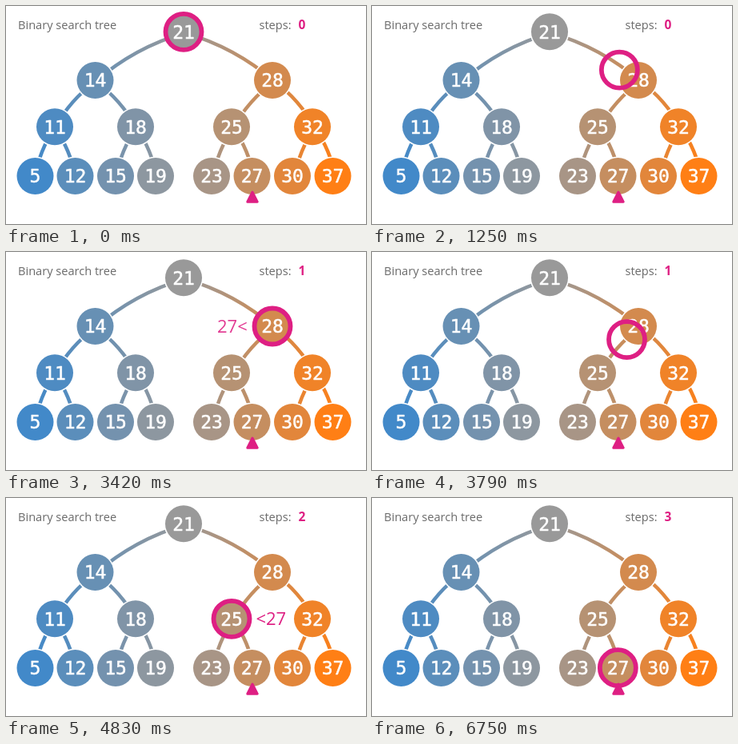
An HTML page with a canvas that plays this animation: 450 px wide and 273 px high, repeating every 8 s.

```html
<!DOCTYPE html>
<html lang="en">
<head>
<meta charset="utf-8">
<title>Binary search tree</title>
<style>
  html, body { margin: 0; width: 100%; height: 100%; overflow: hidden; background: #fff; }
  canvas { display: block; }
</style>
</head>
<body>
<canvas id="stage" width="450" height="273"></canvas>
<script>
const ctx = document.getElementById('stage').getContext('2d');
const LOOP = 8000, FRAME = 1000 / 24;
const PINK = '#de1f83', RADIUS = 23;
const BLUE = [66, 137, 201], GRAY = [153, 153, 153], ORANGE = [255, 127, 21];
const SANS = '"Open Sans", sans-serif';

// In-order list; the height follows from each index
const values = [5, 11, 12, 14, 15, 18, 19, 21, 23, 25, 27, 28, 30, 32, 37];
const xs = [36.5, 61, 86.5, 111.5, 137, 162, 187, 222, 257, 282, 307.5, 333, 358, 383, 408.5];
const rowY = [213, 151.3, 93, 32.3];

const nodes = values.map((value, i) => {
  const height = Math.log2((i + 1) & -(i + 1));
  const end = i < 7 ? BLUE : ORANGE;
  const mix = Math.abs(i - 7) / 7;
  const rgb = GRAY.map((c, j) => Math.round(c + (end[j] - c) * mix));
  return { value, height, x: xs[i], y: rowY[height], color: `rgb(${rgb})` };
});
const [root, right, inner, goal] = [7, 11, 9, 10].map(i => nodes[i]);

const moves = [
  { start: 1000, from: root, to: right },
  { start: 3750, from: right, to: inner },
  { start: 6290, from: inner, to: goal }
];

// Share of a stepped transition completed at time t
function progress(t, start, frames) {
  if (t < start) return 0;
  return Math.min(1, (Math.floor((t - start + 10) / FRAME) + 1) / frames);
}

function disc(x, y, r, color) {
  ctx.fillStyle = color;
  ctx.beginPath();
  ctx.arc(x, y, r, 0, 2 * Math.PI);
  ctx.fill();
}

function label(text, x, y, font, color, align = 'left', outline = 0) {
  ctx.font = font;
  ctx.fillStyle = ctx.strokeStyle = color;
  ctx.textAlign = align;
  ctx.fillText(text, x, y);
  if (outline) {
    ctx.lineWidth = outline;
    ctx.strokeText(text, x, y);
  }
}

function edge(a, b) {
  const side = Math.sign(b.x - a.x);
  const dx = b.x - a.x, dy = b.y - a.y;
  const shade = ctx.createLinearGradient(a.x, a.y, b.x, b.y);
  shade.addColorStop(0, a.color);
  shade.addColorStop(1, b.color);
  ctx.strokeStyle = shade;
  ctx.lineWidth = 4.5;
  ctx.beginPath();
  ctx.moveTo(a.x, a.y);
  ctx.quadraticCurveTo((a.x + b.x) / 2 + side * dy * 0.11,
    (a.y + b.y) / 2 - side * dx * 0.11, b.x, b.y);
  ctx.stroke();
}

function drawTree() {
  // The edge layer is slightly wider and lower than the nodes
  ctx.save();
  ctx.transform(1.009, 0, 0, 1, -0.5, 1.3);
  nodes.forEach((node, i) => {
    if (!node.height) return;
    const reach = 2 ** (node.height - 1);
    edge(node, nodes[i - reach]);
    edge(node, nodes[i + reach]);
  });
  ctx.restore();
  for (const { x, y, color, value } of nodes) {
    disc(x, y, RADIUS + 1.5, '#fff');
    disc(x, y, RADIUS, color);
    label(value, x, y + 8.4, '23px "DejaVu Sans Mono", monospace', '#fff', 'center', 0.5);
  }
}

function drawMarker() {
  ctx.fillStyle = ctx.strokeStyle = PINK;
  ctx.lineWidth = 3;
  ctx.lineJoin = 'round';
  ctx.beginPath();
  ctx.moveTo(308, 233);
  ctx.lineTo(314.2, 245.2);
  ctx.lineTo(301.8, 245.2);
  ctx.closePath();
  ctx.fill();
  ctx.stroke();
}

function drawHint(t, text, x, y, shown, hidden, frames) {
  ctx.globalAlpha = progress(t, shown, frames) - progress(t, hidden, frames);
  label(text, x, y, `22px ${SANS}`, PINK);
  ctx.globalAlpha = 1;
}

function drawRing(t) {
  const { start, from, to } = moves.findLast(m => t >= m.start) || moves[0];
  const p = progress(t, start, 13);
  const eased = 1 - (1 - p) ** 2;
  ctx.strokeStyle = PINK;
  ctx.lineWidth = 5.8;
  ctx.beginPath();
  ctx.arc(from.x + (to.x - from.x) * eased, from.y + (to.y - from.y) * eased,
    22.5, 0, 2 * Math.PI);
  ctx.stroke();
}

function draw(t) {
  ctx.fillStyle = '#fff';
  ctx.fillRect(0, 0, 450, 273);
  label('Binary search tree', 15, 29, `14.6px ${SANS}`, '#6a6a6a');
  label('steps:', 316.5, 29, `14.6px ${SANS}`, '#6a6a6a');
  const steps = [1830, 4250, 6750].filter(time => t >= time).length;
  label(steps, 370, 29, `bold 15.5px ${SANS}`, PINK, 'center');
  drawTree();
  drawMarker();
  drawHint(t, '27<', 264, 101, 1540, 3420, 8);
  drawHint(t, '<27', 312.4, 158.5, 4670, 5750, 5);
  drawRing(t);
}

function tick() {
  draw(performance.now() % LOOP);
  requestAnimationFrame(tick);
}
tick();
</script>
</body>
</html>
```
